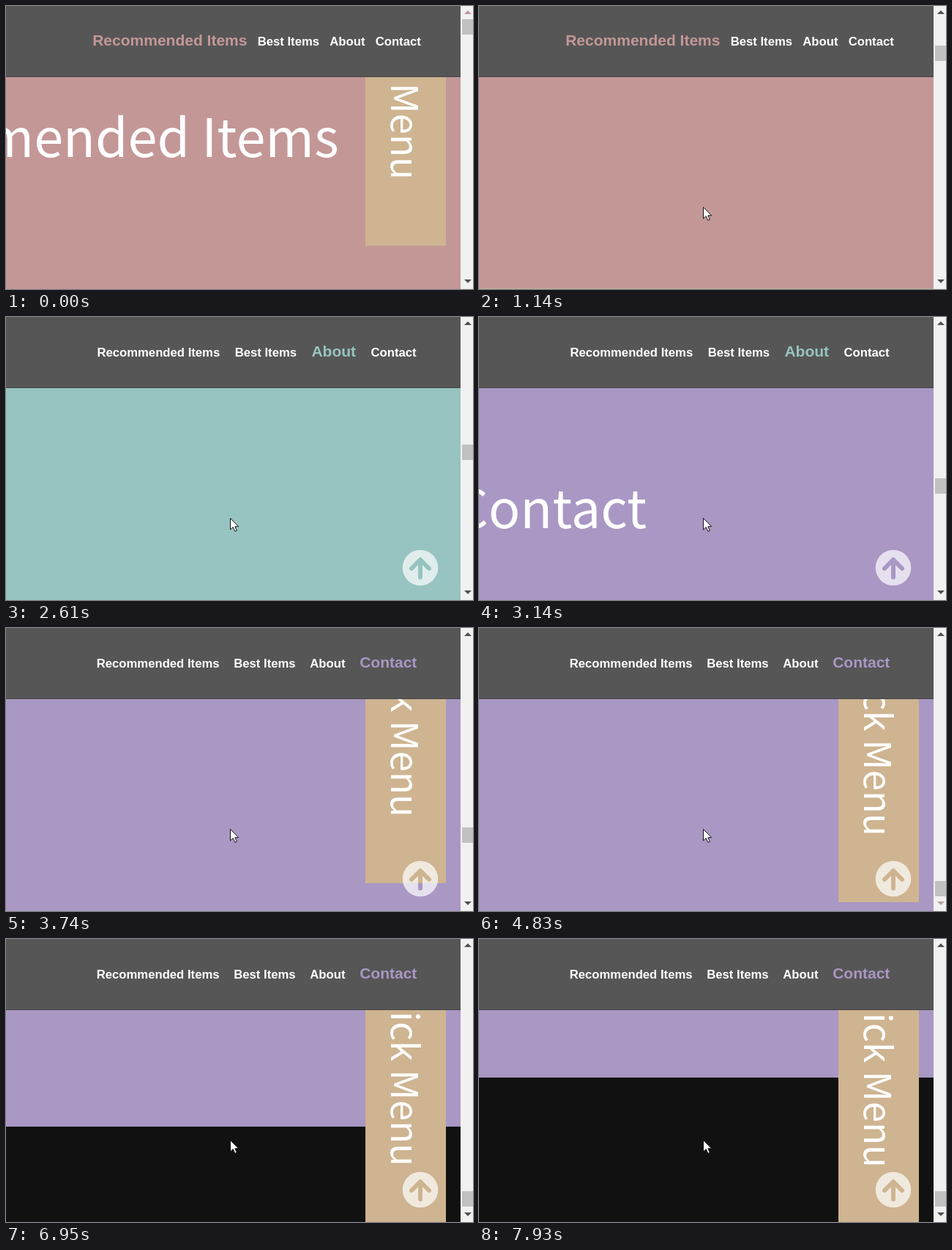
Animation, 638 px wide and 386 px high, one loop 8000 ms. Source, as an HTML page:

```html
<!DOCTYPE html>
<html lang="en">
<head>
<meta charset="utf-8">
<title>Scrolling page with quick menu</title>
<style>
  html, body { margin: 0; width: 100%; height: 100%; overflow: hidden; }
  body { position: relative; background: #c49797; }
  svg { position: absolute; left: 0; top: 0; display: block; }
  svg text { font-family: "Noto Sans CJK KR", "Noto Sans CJK JP", "Noto Sans CJK SC", "Open Sans", sans-serif; fill: #fff; }
  nav {
    position: absolute; left: 104px; top: 35px; width: 477px;
    display: flex; justify-content: space-evenly;
    font: bold 21px/24px "Liberation Sans", Arial, sans-serif;
    white-space: nowrap;
  }
  nav b { line-height: 1; }
</style>
</head>
<body>
<svg width="638" height="386" viewBox="0 0 638 386">
  <defs>
    <mask id="cut" maskUnits="userSpaceOnUse" x="-30" y="-30" width="60" height="60">
      <circle r="24.3" fill="#fff"/>
      <path d="M-12 1 L0 -11 L12 1 M0 -10 V13" fill="none" stroke="#000"
        stroke-width="6" stroke-linecap="round" stroke-linejoin="round"/>
    </mask>
  </defs>
  <g id="page"></g>
  <rect id="footer" width="621" height="386" fill="#111"/>
  <g id="menu">
    <rect x="491" y="-460" width="110" height="460" fill="#ceb491"/>
    <text transform="translate(525.5 -90) rotate(90)" text-anchor="end" font-size="51">Quick Menu</text>
  </g>
  <g id="top"><circle r="25" fill="#fff" fill-opacity=".7" mask="url(#cut)"/></g>
  <rect width="621" height="97" fill="#565656"/>
  <rect y="96" width="621" height="1" fill="#444"/>
  <rect x="621" width="17" height="386" fill="#f1f1f1"/>
  <rect id="thumb" x="623" width="15" height="21" fill="#c1c1c1"/>
  <path id="up" d="M626 11 L631 6 L636 11 Z"/>
  <path id="down" d="M626 373 L631 378 L636 373 Z"/>
  <path id="cursor" transform="translate(306 274)" fill="#fff" stroke="#111"
    d="M.5 .5 V16 L4.2 12.6 L6.8 18.4 L9.3 17.3 L6.8 11.8 H11.6 Z"/>
</svg>
<nav id="nav"></nav>
<script>
const LOOP = 8000, PX_PER_THUMB = 18.4, THUMB_TOP = 18, THUMB_END = 345;
const $ = id => document.getElementById(id);

// top: place in the page, on: when its link lights up
const sections = [
  { name: 'Recommended Items', top: 0,    rgb: [196, 151, 151], on: -1000 },
  { name: 'Best Items',        top: 1050, rgb: [183, 196, 151], on: 1150 },
  { name: 'About',             top: 1970, rgb: [151, 196, 192], on: 1950 },
  { name: 'Contact',           top: 3800, rgb: [169, 151, 196], on: 3340 }
];

// Key points as [time, value]
const thumbPath = [[700, THUMB_TOP], [1750, 104], [2610, 174], [3740, 272], [4700, THUMB_END]];
const menuPath = [[3270, 60], [3740, 348], [4830, 374], [6950, 400], [7930, 402]];
const footerPath = [[5290, 386], [6950, 256], [7930, 189]];

const clamp = p => Math.min(1, Math.max(0, p));
const smooth = p => p * p * (3 - 2 * p);
const easeOut = p => 1 - (1 - p) ** 2;
const part = (t, start, length) => clamp((t - start) / length);

// Sum of the clamped linear segments
const along = (path, t) => path.slice(1).reduce((v, [t1, b], i) => {
  const [t0, a] = path[i];
  return v + (b - a) * part(t, t0, t1 - t0);
}, path[0][1]);

const lit = (s, t) => s ? smooth(part(t, s.on, 300)) : 0;
const move = (id, x, y) => $(id).setAttribute('transform', `translate(${x} ${y})`);
const arrowFill = (id, color) => $(id).setAttribute('fill', color);

$('page').innerHTML = sections.map(s =>
  `<rect y="${s.top}" width="621" height="7000" fill="rgb(${s.rgb})"/>` +
  `<text x="98" y="${s.top + 206}" text-anchor="middle" font-size="72">${s.name}</text>`).join('');
$('nav').innerHTML = sections.map(s => `<span><b>${s.name}</b></span>`).join('');
const links = [...document.querySelectorAll('nav b')];

function draw(t) {
  const thumb = along(thumbPath, t);
  const scroll = (thumb - THUMB_TOP) * PX_PER_THUMB;
  move('page', 0, -scroll);
  move('menu', 0, t < 2000 ? 327 - scroll : along(menuPath, t));
  move('top', 566, 412 - 70 * easeOut(part(t, 1350, 540)));
  $('footer').setAttribute('y', along(footerPath, t));
  $('thumb').setAttribute('y', Math.round(thumb) - (t >= 4960 ? 1 : 0));
  arrowFill('up', thumb === THUMB_TOP ? '#c49797' : '#505050');
  arrowFill('down', thumb >= THUMB_END && t < 4960 ? '#b5a39a' : '#505050');
  $('cursor').style.display = t < 70 ? 'none' : '';

  sections.forEach((s, i) => {
    const w = lit(s, t) - lit(sections[i + 1], t);
    links[i].style.fontSize = 16.7 + 4.3 * w + 'px';
    links[i].style.color = `rgb(${s.rgb.map(c => Math.round(255 + (c - 255) * w))})`;
  });
}

const start = performance.now();
function tick(now) {
  draw(Math.max(0, now - start) % LOOP);
  requestAnimationFrame(tick);
}
draw(0);
requestAnimationFrame(tick);
</script>
</body>
</html>
```
